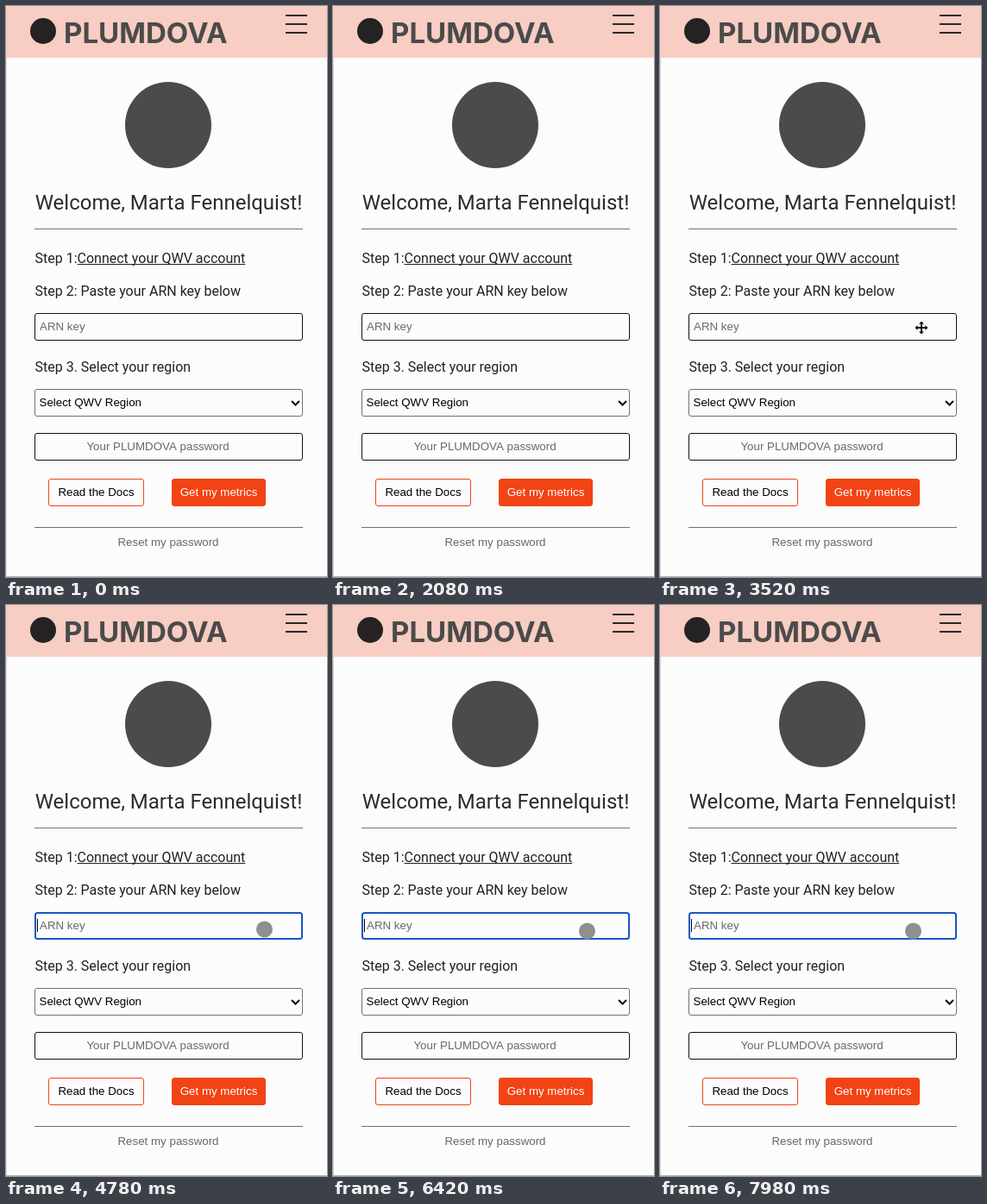
These frames come from a looping animation (372x662 px, 8 s). An HTML page with a canvas:

```html
<!DOCTYPE html>
<html lang="en">
<head>
<meta charset="utf-8">
<title>Account setup</title>
<style>
  html, body { margin: 0; width: 100%; height: 100%; overflow: hidden; background: #fcfcfd; }
  canvas { display: block; width: 372px; height: 662px; }
</style>
</head>
<body>
<canvas id="stage"></canvas>
<script>
const W = 372, H = 662, LOOP = 8000;
const FOCUS = 4180;
const BG = '#fcfcfd', INK = '#212126', MUTED = '#68686f', BRAND = '#4b4b4b';
const RULE = '#70707f', ORANGE = '#f24314';
const HEAD = 'Roboto, sans-serif', UI = '"Liberation Sans", Arial, sans-serif';

// Pointer path: time, x, y
const PATH = [
  [2480, 384, 361], [2820, 339, 368], [3140, 316, 371], [3520, 303, 373],
  [4180, 300, 375.5], [4780, 299.5, 376], [5600, 296, 377.5],
  [6420, 294.5, 378], [7980, 293.5, 378]
];

const canvas = document.getElementById('stage');
const ctx = canvas.getContext('2d');
const dpr = window.devicePixelRatio || 1;
canvas.width = W * dpr;
canvas.height = H * dpr;

function text(str, x, y, size, color, family = UI, weight = 400, align = 'left') {
  ctx.font = `${weight} ${size}px ${family}`;
  ctx.fillStyle = color;
  ctx.textAlign = align;
  ctx.fillText(str, x, y);
  return ctx.measureText(str).width;
}

function rect(x, y, w, h, color) {
  ctx.fillStyle = color;
  ctx.fillRect(x, y, w, h);
}

function disc(x, y, r, color) {
  ctx.fillStyle = color;
  ctx.beginPath();
  ctx.arc(x, y, r, 0, Math.PI * 2);
  ctx.fill();
}

function box(x, y, w, h, stroke, line = 1, fill = BG) {
  const inset = line / 2;
  ctx.beginPath();
  ctx.roundRect(x + inset, y + inset, w - line, h - line, 2.5);
  ctx.fillStyle = fill;
  ctx.fill();
  ctx.strokeStyle = stroke;
  ctx.lineWidth = line;
  ctx.stroke();
}

function header() {
  rect(0, 0, W, 60, '#f8cdc3');
  disc(43, 29, 15, '#242222');
  text('PLUMDOVA', 67, 43, 33, BRAND, 'Inter, sans-serif', 700);
  for (const y of [10, 20, 30]) rect(324, y, 25, 2, '#2c2828');
}

function form(focused) {
  disc(188, 138, 50, BRAND);
  text('Welcome, Marta Fennelquist!', 188.5, 236, 24, '#2b2b30', HEAD, 400, 'center');
  rect(33, 258, 311, 1, RULE);

  const step = text('Step 1:', 33.5, 298, 16, INK, HEAD);
  const link = text('Connect your QWV account', 33.5 + step, 298, 16, INK, HEAD);
  rect(33.5 + step, 299, link, 1, INK);
  text('Step 2: Paste your ARN key below', 33.5, 336, 16, INK, HEAD);

  box(33, 356, 311, 32, focused ? '#1a56c4' : '#111', focused ? 2 : 1);
  text('ARN key', 39, 376, 13.333, MUTED);
  if (focused) rect(36, 364, 1, 15, '#000');

  text('Step 3. Select your region', 33.5, 424, 16, INK, HEAD);
  box(33, 444, 311, 32, '#707076');
  text('Select QWV Region', 38.5, 464, 13.333, '#000');
  ctx.beginPath();
  ctx.moveTo(331, 458);
  ctx.lineTo(335.5, 462.5);
  ctx.lineTo(340, 458);
  ctx.strokeStyle = '#111';
  ctx.lineWidth = 2;
  ctx.stroke();

  box(33, 495, 311, 32, '#111');
  text('Your PLUMDOVA password', 176, 515, 13.333, MUTED, UI, 400, 'center');

  box(49, 548, 111, 32, ORANGE);
  text('Read the Docs', 104.5, 568, 13.333, '#000', UI, 400, 'center');
  box(192, 548, 109, 32, ORANGE, 1, ORANGE);
  text('Get my metrics', 246.5, 568, 13.333, '#fff', UI, 400, 'center');

  rect(33, 604, 311, 1, RULE);
  text('Reset my password', 188, 626, 13.333, MUTED, UI, 400, 'center');
}

function pointerAt(t) {
  const i = PATH.findIndex(p => p[0] > t);
  if (i === 0) return null;
  if (i < 0) return PATH[PATH.length - 1].slice(1);
  const [t0, x0, y0] = PATH[i - 1], [t1, x1, y1] = PATH[i];
  const k = (t - t0) / (t1 - t0);
  return [x0 + (x1 - x0) * k, y0 + (y1 - y0) * k];
}

function moveCursor(x, y) {
  const arms = new Path2D('M-5 0H5M0-5V5');
  const heads = new Path2D('M0-7.5l3 3h-6zM0 7.5l3-3h-6zM-7.5 0l3-3v6zM7.5 0l-3-3v6z');
  ctx.save();
  ctx.translate(x, y);
  ctx.strokeStyle = BG;
  ctx.lineWidth = 4;
  ctx.stroke(arms);
  ctx.lineWidth = 2;
  ctx.stroke(heads);
  ctx.strokeStyle = ctx.fillStyle = '#111';
  ctx.stroke(arms);
  ctx.fill(heads);
  ctx.restore();
}

function draw(t) {
  const focused = t >= FOCUS;
  ctx.setTransform(dpr, 0, 0, dpr, 0, 0);
  rect(0, 0, W, H, BG);
  header();
  form(focused);
  rect(0, 60, 1, H - 60, '#d6d6d8');
  rect(0, H - 1, W, 1, '#b4b4b8');

  const pointer = pointerAt(t);
  if (!pointer) return;
  if (focused) disc(...pointer, 9.5, '#8f8f8f');
  else moveCursor(...pointer);
}

const start = performance.now();
function tick() {
  draw((performance.now() - start) % LOOP);
  requestAnimationFrame(tick);
}
tick();
</script>
</body>
</html>
```
